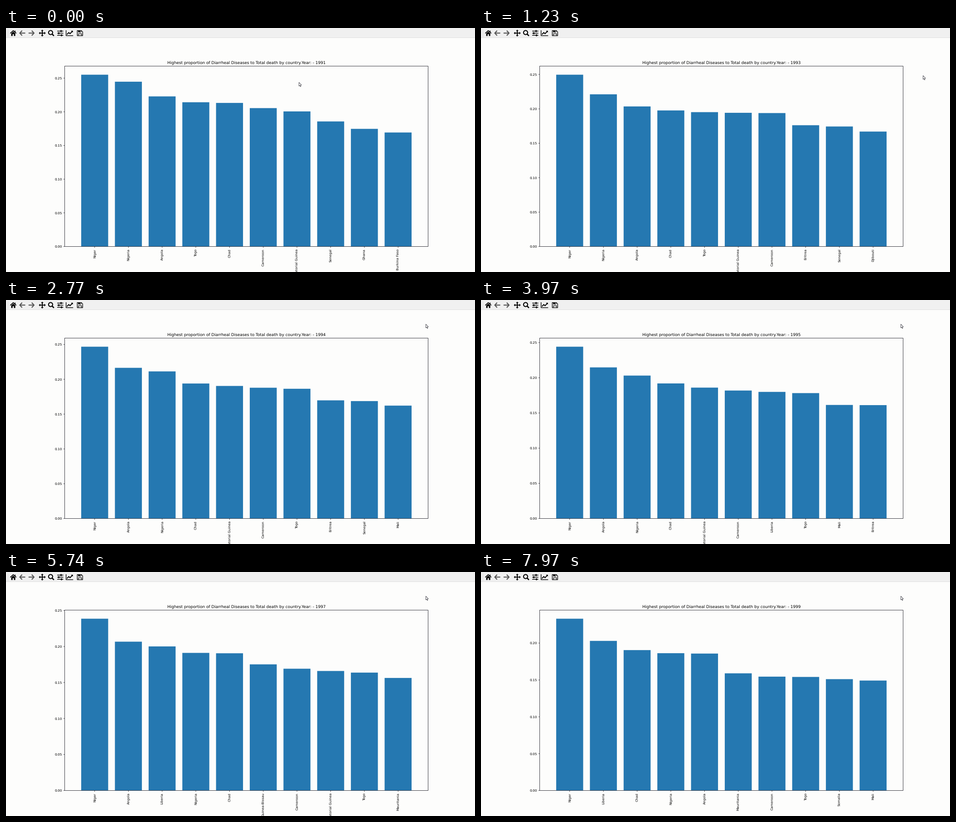
Recreate the animation shown at these times as a matplotlib script. Size 1035 by 541 pixels, loop 8000 ms.

```python
import numpy as np
import matplotlib.pyplot as plt
from matplotlib.animation import FuncAnimation
from matplotlib.patches import Circle, Polygon, Rectangle

W, H, DPI = 1035, 541, 100
FRAMES, STEP = 200, 40            # 8000 ms per loop
FIRST_YEAR, LAST_YEAR = 1991, 1999
FIRST_SWITCH, YEAR_MS = 160, 1020
PX = 72 / DPI                     # one pixel in points

BAR_BLUE, PAPER, PANEL, INK = "#2578b1", "#fdfdfc", "#f0f0f0", "#26262f"

# Plot area in pixels, y pointing down
LEFT, RIGHT, TOP, BOTTOM = 129.5, 931.5, 84.5, 484.5
UNIT = (RIGHT - LEFT) / 10.78     # ten bars 0.8 wide plus 5% margins
TICK = 2.6

trends = []


def trend(name, start, end=None, first=FIRST_YEAR, last=LAST_YEAR, bend=1.0):
    """Share moving from start to end; bend > 1 falls early, < 1 falls late."""
    trends.append((name, start, start if end is None else end, first, last, bend))


trend("Niger", .2551, .2331)
trend("Nigeria", .2447, .1863, bend=1.8)
trend("Togo", .2142, .1541, bend=1.32)
trend("Chad", .2132, .1905, bend=4)
trend("Cameroon", .2055, .1545, bend=0.9)
trend("Angola", .2229, .2035, last=1993)
trend("Angola", .2165, .2067, 1994, 1997, bend=0.5)
trend("Angola", .1875, .1858, 1998)
trend("Equatorial Guinea", .2006, .1660, last=1997, bend=0.5)
trend("Senegal", .1857, .1687, last=1994)
trend("Ghana", .1747, .1690, last=1992)
trend("Burkina Faso", .1693, last=1991)
trend("Eritrea", .1820, .1611, 1992, 1995, bend=0.8)
trend("Djibouti", .1670, first=1993, last=1993)
trend("Mali", .1622, .1605, 1994, 1996)
trend("Mali", .1492, first=1999)
trend("Liberia", .1799, .2030, 1995, bend=3)
trend("Mauritania", .1550, .1590, 1996)
trend("Guinea-Bissau", .1752, first=1997, last=1997)
trend("Somalia", .1527, .1511, 1998)
trend("Rwanda", .1493, first=1998, last=1998)


def ranking(year):
    found = []
    for name, start, end, first, last, bend in trends:
        if first <= year <= last:
            left = (last - year) / max(last - first, 1)
            found.append((end + (start - end) * left ** bend, name))
    return sorted(found, reverse=True)[:10]


# Key points of the pointer tip: time, x, y
POINTER = np.array([(300, 646.5, 120.5), (1200, 975.5, 105.5),
                    (1400, 990, 95), (1900, 926.5, 53.5)])
POINTER_SHAPE = np.array([(0, 0), (0, 8.3), (1.9, 6.7), (3.2, 9.6),
                          (4.4, 9.0), (3.2, 6.2), (5.6, 6.0)])

plt.rcParams.update({"font.family": "DejaVu Sans", "toolbar": "None",
                     "text.hinting": "none", "path.snap": False})
fig = plt.figure(figsize=(W / DPI, H / DPI), dpi=DPI, facecolor=PAPER)
ax = fig.add_axes([0, 0, 1, 1])
ax.set_xlim(0, W)
ax.set_ylim(H, 0)
ax.axis("off")


def line(points, width=1.0, color="black", z=3):
    xs, ys = zip(*points)
    item, = ax.plot(xs, ys, color=color, lw=width * PX, zorder=z,
                    solid_capstyle="butt", solid_joinstyle="miter")
    return item


def poly(points):
    ax.add_patch(Polygon(points, closed=True, fc="black", lw=0, zorder=3))


def rect(x0, y0, x1, y1, color="black", z=3):
    return ax.add_patch(Rectangle((x0, y0), x1 - x0, y1 - y0,
                                  fc=color, lw=0, zorder=z))


def label(x, y, size, **kw):
    return ax.text(x, y, "", fontsize=size * PX, color="black", **kw)


def draw_arrow(cx, way):
    tip = cx + 6 * way
    line([(cx - 6 * way, 11.3), (tip - way, 11.3)], 2.2, "#555555")
    line([(cx + way, 5.8), (tip, 11.3), (cx + way, 16.8)], 2.2, "#555555")


def draw_home():
    line([(9.3, 11.8), (16, 5.8), (22.7, 11.8)], 1.7)
    rect(19.2, 5.8, 20.9, 9.5)
    poly([(11.5, 12), (16, 8), (20.5, 12), (20.5, 17.7), (17.4, 17.7),
          (17.4, 13.6), (14.6, 13.6), (14.6, 17.7), (11.5, 17.7)])


def draw_move(cx=80, cy=11.3):
    for dx, dy in [(1, 0), (-1, 0), (0, 1), (0, -1)]:
        line([(cx, cy), (cx + 5.5 * dx, cy + 5.5 * dy)], 2)
        bx, by = cx + 4.6 * dx, cy + 4.6 * dy
        poly([(cx + 7.6 * dx, cy + 7.6 * dy),
              (bx + 3 * dy, by + 3 * dx), (bx - 3 * dy, by - 3 * dx)])


def draw_zoom():
    ax.add_patch(Circle((98.4, 10.1), 4.5, fill=False, ec="black", lw=2.1 * PX))
    line([(101.4, 13.1), (105.8, 17.5)], 2.6)


def draw_sliders():
    for y, knob in [(6.8, 121.5), (11.5, 116.5), (16.2, 122.5)]:
        line([(113, y), (126.5, y)], 1.5)
        rect(knob - 1.4, y - 2, knob + 1.4, y + 2)


def draw_chart():
    line([(132.6, 5), (132.6, 17), (148.2, 17)], 1.4)
    line([(134.5, 14.3), (138.5, 10.2), (141.3, 12.6), (146, 7.8)], 2)
    poly([(143.4, 6), (147.6, 6), (147.6, 10.2)])


def draw_disk():
    line([(157.3, 5.7), (166.3, 5.7), (169.2, 8.6), (169.2, 17.1),
          (157.3, 17.1), (157.3, 5.1)], 1.3)
    rect(159.3, 5.7, 166, 9.8)
    rect(163.2, 6.4, 164.8, 8.8, PANEL, 4)
    line([(159.8, 17), (159.8, 12.7), (166.7, 12.7), (166.7, 17)], 1.2)


def draw_toolbar():
    rect(0, 0, W, 21, PANEL, 1)
    line([(0, 21.5), (W, 21.5)], 1, "#dfdfdf", 2)
    line([(4.5, 3), (4.5, 20)], 1, "#d9d9d9", 2)
    draw_home()
    draw_arrow(36.5, -1)
    draw_arrow(55.8, 1)
    draw_move()
    draw_zoom()
    draw_sliders()
    draw_chart()
    draw_disk()


draw_toolbar()

# Chart parts that are refilled every year
centers = LEFT + UNIT * (0.89 + np.arange(10))
bars = [rect(x - 0.4 * UNIT, TOP, x + 0.4 * UNIT, BOTTOM, BAR_BLUE, 2) for x in centers]
names = [label(x, BOTTOM + 2 * TICK, 7.42, rotation=90, ha="center", va="top")
         for x in centers]
for x in centers:
    line([(x, BOTTOM), (x, BOTTOM + TICK)], 0.9, INK)
line([(LEFT, TOP), (RIGHT, TOP), (RIGHT, BOTTOM), (LEFT, BOTTOM), (LEFT, TOP)],
     0.9, INK, 4)

levels = np.arange(6) * 0.05
marks = [line([(LEFT - TICK, BOTTOM), (LEFT, BOTTOM)], 0.9, INK) for _ in levels]
scale = [label(LEFT - 2 * TICK, BOTTOM, 7.42, ha="right", va="center_baseline")
         for _ in levels]
for text, level in zip(scale, levels):
    text.set_text(f"{level:.2f}")

title = label((LEFT + RIGHT) / 2, TOP - 4.5, 8.92, ha="center", va="baseline")
pointer = ax.add_patch(Polygon(POINTER_SHAPE, closed=True, fc="white", ec="#3a3a42",
                               lw=0.85 * PX, joinstyle="miter", zorder=9))


def show_year(year):
    rows = ranking(year)
    limit = rows[0][0] * 1.05
    per_unit = (BOTTOM - TOP) / limit
    for bar, name, (share, country) in zip(bars, names, rows):
        bar.set_y(BOTTOM - share * per_unit)
        bar.set_height(share * per_unit)
        name.set_text(country)
    for mark, text, level in zip(marks, scale, levels):
        y = BOTTOM - level * per_unit
        mark.set_ydata([y, y])
        text.set_y(y)
        mark.set_visible(level <= limit)
        text.set_visible(level <= limit)
    title.set_text("Highest proportion of Diarrheal Diseases to Total death "
                   f"by country.Year: - {year}")


def update(i):
    t = i * STEP
    show_year(FIRST_YEAR + (t - FIRST_SWITCH) // YEAR_MS + 1)
    tip = [np.interp(t, POINTER[:, 0], POINTER[:, k]) for k in (1, 2)]
    pointer.set_xy(POINTER_SHAPE + tip)
    return []


update(0)
anim = FuncAnimation(fig, update, frames=FRAMES, interval=STEP,
                     repeat=True, repeat_delay=0, blit=False)
plt.show()
```
